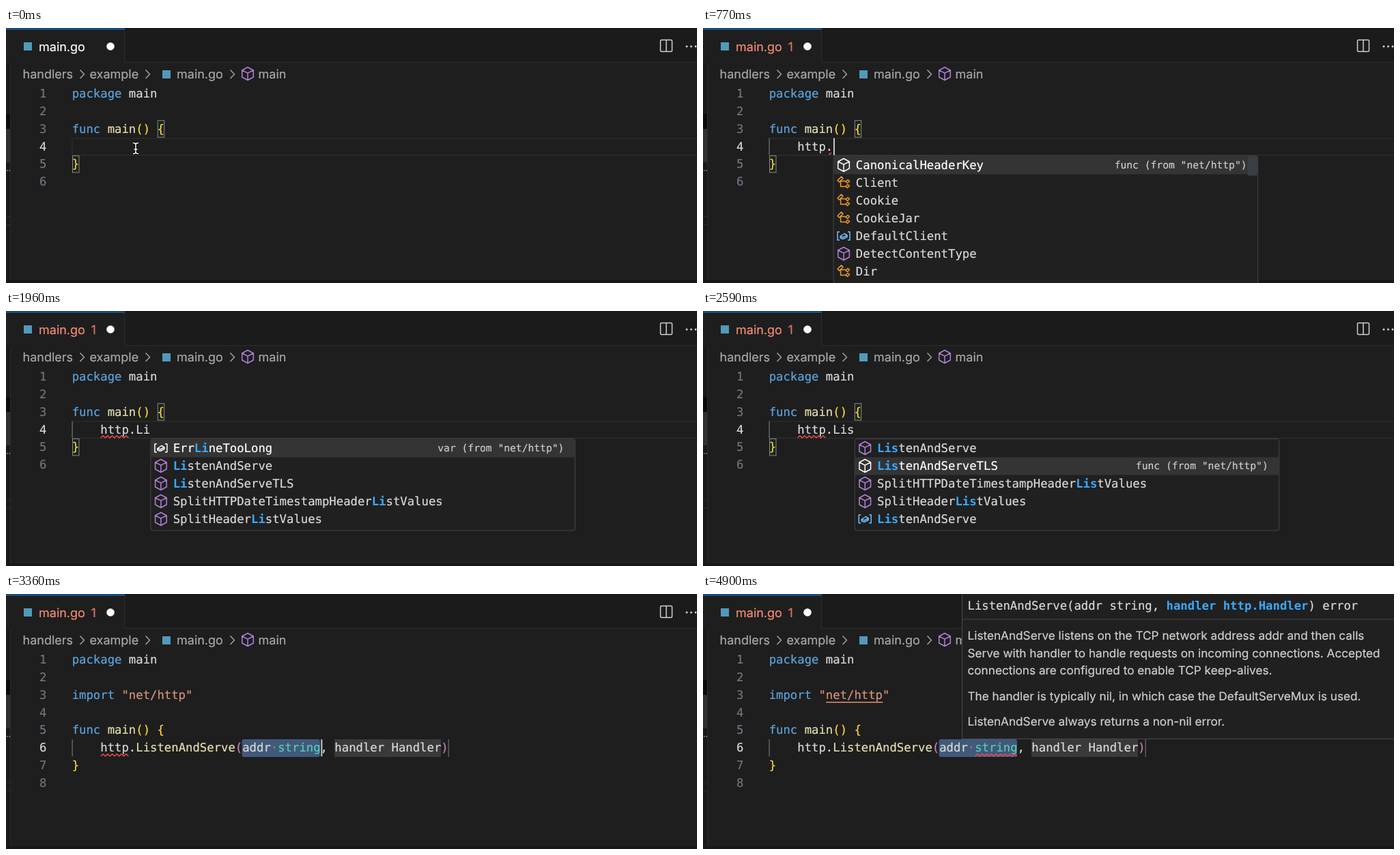
Recreate the animation shown at these times as an HTML page. Size 1012 by 374 pixels, loop 5390 ms.

```html
<!DOCTYPE html>
<html lang="en">
<head>
<meta charset="utf-8">
<title>Editor completion</title>
<style>
  html, body { margin: 0; height: 100%; overflow: hidden; background: #1e1e1e; }
  svg { display: block; width: 1012px; height: 374px; }
  /* a hairline stroke gives the text its slightly heavy smoothing */
  text { white-space: pre; text-rendering: geometricPrecision; font: 18px Inter, sans-serif;
    fill: currentColor; stroke: currentColor; stroke-width: .2px; }
  tspan { fill: currentColor; stroke: currentColor; }
  .mono { font: 17.27px "DejaVu Sans Mono", monospace; }
  .doc { font-size: 17.2px; }
  .detail { font: 14.65px "DejaVu Sans Mono", monospace; text-anchor: end; }
  .num { text-anchor: end; }
  .hit { font-weight: bold; color: #3aa9ff; stroke: none; }
  .icon { fill: none; stroke-width: 1.5; stroke-linejoin: round; }
</style>
</head>
<body>
<svg viewBox="0 0 1012 374">
  <rect width="1012" height="374" fill="#1e1e1e"/>
  <rect x="174" width="838" height="51" fill="#1b1b1b"/>
  <path d="M173.5 2V50.5H1012" fill="none" stroke="#2d2d2d"/>
  <rect width="1012" height="1" fill="#151515"/>
  <rect y=".6" width="174" height="1.8" fill="#1468b4"/>
  <!-- sidebar sliver and lower edge -->
  <rect y="52" width="6" height="322" fill="#191919"/>
  <rect y="126" width="6" height="22" fill="#0b0b0b"/>
  <rect y="148" width="6" height="49" fill="#303030"/>
  <path d="M6.5 52V374M0 276.5H6M0 288.5H6" stroke="#2b2b2b"/>
  <path d="M1 209h1.6M4.5 209h1.6" stroke="#999" stroke-width="1.6"/>
  <rect y="370" width="1012" height="4" fill="#171717"/>
  <!-- tab and toolbar -->
  <rect x="26" y="21" width="12" height="12" fill="#519aba"/>
  <circle cx="153" cy="27" r="5.8" fill="#fff"/>
  <g class="icon" stroke="#d0d0d0"><rect x="958.5" y="17.5" width="17" height="17" rx="1.5"/><path d="M967 18V34"/></g>
  <g fill="#d0d0d0"><circle cx="997" cy="27" r="1.5"/><circle cx="1003.5" cy="27" r="1.5"/><circle cx="1010" cy="27" r="1.5"/></g>
  <!-- breadcrumbs -->
  <g color="#a9a9a9">
    <text x="24.5" y="74">handlers</text><text x="122.5" y="74">example</text>
    <text x="250" y="74">main.go</text><text x="369.5" y="74">main</text>
  </g>
  <path class="icon" stroke="#a0a0a0" d="M108.5 61.5l6 6.3-6 6.3M204.5 61.5l6 6.3-6 6.3M328.5 61.5l6 6.3-6 6.3"/>
  <rect x="229" y="62" width="12" height="12" fill="#519aba"/>
  <g id="view"></g>
</svg>
<script>
const LOOP = 5390, CH = 10.397, ROW = 25.85;
const KEY = '#5ba6e2', FN = '#e4e2b0', GOLD = '#ffd83c', TXT = '#dadada',
      STR = '#d99479', PINK = '#c586c0', TYPE = '#55d0b8';
const ICONS = {
  func: ['#b180d7', 'M0-9.5L8.3-5V5L0 9.5L-8.3 5V-5ZM-8.3-5L0-.8L8.3-5M0-.8V9.5'],
  type: ['#ee9d28', 'M-9-3.5L-3.5-9L-1-6.5L-6.5-1ZM3-2.5H-4.5V5.5H3M3-1.5L6-4.5L8.5-2.5L5.5.5ZM3 5.5L6 2.5L8.5 4.5L5.5 7.5Z'],
  var: ['#75beff', 'M-6-6H-9V6H-6M6-6H9V6H6M-5 .5L1-3.5L5-1V1.5L-1 4.5L-5 3ZM-5 .5L-1 2L5-1']
};

const packages = [['pkg', 'http'], ['pkg', 'httptest'], ['pkg', 'httptrace'], ['pkg', 'httputil'], ['pkg', 'http']];
const members = [['func', 'CanonicalHeaderKey'], ['type', 'Client'], ['type', 'Cookie'], ['type', 'CookieJar'],
  ['var', 'DefaultClient'], ['func', 'DetectContentType'], ['type', 'Dir']];
const listen = [['func', 'ListenAndServe'], ['func', 'ListenAndServeTLS'],
  ['func', 'SplitHTTPDateTimestampHeaderListValues'], ['func', 'SplitHeaderListValues']];
const withLi = [['var', 'ErrLineTooLong'], ...listen];
const withLis = [...listen, ['var', 'ListenAndServe']];

// Timelines: [start, value...]
const typed = [[0, ''], [70, 'h'], [140, 'ht'], [210, 'htt'], [490, 'http'], [630, 'http.'],
  [1260, 'http.L'], [1400, 'http.Li'], [2030, 'http.Lis']];
const caret = [[0, 0], [70, 1], [1120, 0], [1260, 1], [1960, 0], [2030, 1], [2590, 0],
  [3080, 1], [3850, 0], [4410, 1], [4900, 0]];
const popups = [[0], [280, packages, 'htt', 7], [560, packages, 'http', 8], [630], [700, members, '', 9],
  [1330, withLi, 'L', 10], [1470, withLi, 'Li', 11], [2100, withLis, 'Lis', 12],
  [2450, withLis, 'Lis', 12, 1], [2870, withLis, 'Lis', 12], [3360]];
const errors = [[0], [350, 4, 7], [490, 4, 8], [630], [770, 8.4, 9], [1540, 4, 8], [3640, 29, 35]];

const at = (list, t) => list.findLast(step => step[0] <= t);
const colX = col => 97 + col * CH;
const lineY = n => 96 + (n - 1) * ROW;
const rect = (x, y, w, h, fill, extra = '') => `<rect x="${x}" y="${y}" width="${w}" height="${h}" fill="${fill}" ${extra}/>`;
const text = (x, y, color, s, cls = '') => `<text x="${x}" y="${y}" color="${color}" class="${cls}">${s}</text>`;
const span = (s, color) => `<tspan color="${color}">${s}</tspan>`;

function code(n, col, ...parts) {
  let s = '';
  for (let i = 0; i < parts.length; i += 2) s += span(parts[i], parts[i + 1]);
  return text(colX(col) - .3, lineY(n) + 6, TXT, s, 'mono');
}

function numbers(count, active) {
  let s = '';
  for (let n = 1; n <= count; n++) s += text(59.5, lineY(n) + 6, n === active ? '#d8d8d8' : '#6e7681', n, 'mono num');
  return s;
}

function icon(kind, x, y, stroke) {
  if (kind === 'pkg') return text(x - 10.4, y + 6, '#d0d0d0', '{}', 'mono');
  const [color, d] = ICONS[kind];
  return `<path class="icon" transform="translate(${x} ${y})" stroke="${stroke || color}" d="${d}"/>`;
}

function squiggle(n, from, to) {
  const y = lineY(n) + 12.5;
  let d = '';
  for (let x = colX(from), up = 0; x <= colX(to); x += 3.4, up = !up) d += `${d ? 'L' : 'M'}${x} ${y - (up ? 3 : 0)}`;
  return `<path d="${d}" fill="none" stroke="#f14c4c" stroke-width="1.4"/>`;
}

const guide = n => rect(96.5, lineY(n) - 12, 1.2, 25, '#707070');
const caretAt = (n, col) => rect(colX(col) + .4, lineY(n) - 12, 2, 25, '#c8c8c8');
const bracketBox = (n, col) => rect(colX(col) + .5, lineY(n) - 12, 9.5, 24.5, '#1b251b', 'stroke="#888"');

function popup(items, match, col, sel = 0) {
  const x = colX(col) + .5, all = items === members;
  let s = rect(x, 187.5, 621.5, all ? 200 : 134.5, '#202020', 'stroke="#454545" rx="3"')
    + rect(x + .5, 188.5 + sel * 26, 620.5, 26, '#343435');
  if (all) s += rect(x + 606.5, 188.5, 14, 28, '#3b3e44');
  items.forEach(([kind, name], i) => {
    const y = 201 + i * 26, on = i === sel, k = name.indexOf(match);
    const label = name.slice(0, k) + `<tspan class="hit">${match}</tspan>` + name.slice(k + match.length);
    s += icon(kind, x + 15, y, on && '#fff') + text(x + 32.8, y + 6, on ? '#fff' : TXT, label, 'mono');
    if (on) {
      const word = kind === 'pkg' ? '"net/http"' : `${kind} (from "net/http")`;
      s += text(x + 605.5, y + 5, '#cccccc', word, 'detail');
    }
  });
  return s;
}

function signature() {
  const doc = [[67, 'ListenAndServe listens on the TCP network address addr and then calls'],
    [92.5, 'Serve with handler to handle requests on incoming connections. Accepted'],
    [118, 'connections are configured to enable TCP keep-alives.'],
    [155.5, 'The handler is typically nil, in which case the DefaultServeMux is used.'],
    [193, 'ListenAndServe always returns a non-nil error.']];
  return rect(379.5, -4, 650, 216.5, '#202020', 'stroke="#4a4a4a"') + rect(380, 36.5, 632, 1, '#454545')
    + text(387.5, 22.5, TXT, 'ListenAndServe(addr string, <tspan class="hit">handler http.Handler</tspan>) error', 'mono')
    + doc.map(([y, s]) => text(387.5, y, '#d0d0d0', s, 'doc')).join('');
}

const mouse = (color, width) => `<path d="M186 168.5Q190 168.5 190 171V181.5Q190 184.5 186 184.5M194 168.5Q190 168.5 190 171V181.5Q190 184.5 194 184.5M187.5 178H192.5" fill="none" stroke="${color}" stroke-width="${width}"/>`;
const mainFunc = n => code(n, 0, 'func ', KEY, 'main', FN, '() {', GOLD);

function underline(n, t) {
  const [, from, to] = at(errors, t);
  return from ? squiggle(n, from, to) : '';
}

function typing(t) {
  const word = at(typed, t)[1], [, items, ...rest] = at(popups, t);
  let s = numbers(6, 4)
    + '<path d="M1012 162H97V186.5H1012" fill="none" stroke="#2c2c2c" stroke-width="1.5"/>'
    + bracketBox(3, 12) + bracketBox(5, 0)
    + mainFunc(3) + code(4, 4, word, TXT) + code(5, 0, '}', GOLD)
    + (word ? guide(4) : mouse('#000', 3.5) + mouse('#fff', 1.5))
    + underline(4, t);
  if (at(caret, t)[1]) s += caretAt(4, 4 + word.length);
  return s + (items ? popup(items, ...rest) : '');
}

function inserted(t) {
  const y = lineY(6) - 12.2;
  let s = numbers(8, 6) + guide(6)
    + code(3, 0, 'import ', KEY, '"net/http"', STR) + mainFunc(5)
    + rect(colX(24) - 1, y, 11 * CH, 26, '#41597a', 'rx="3"') + rect(colX(37) - .7, y, 15 * CH, 26, '#3a3a3b')
    + rect(647.5, y, 1.5, 26, '#5c5c5c')
    + code(6, 4, 'http.', TXT, 'ListenAndServe', FN, '(', PINK, 'addr', TXT, '·', '#73879c',
      'string', TYPE, ', handler Handler', TXT, ')', PINK)
    + code(7, 0, '}', GOLD) + underline(6, t);
  if (t >= 4410) s += rect(colX(8), 158, 8 * CH, 1.5, STR);
  if (at(caret, t)[1]) s += caretAt(6, 35);
  return s + (t >= 3500 ? signature() : '');
}

function render(t) {
  const bad = t >= 350;
  return text(48, 33.5, bad ? '#f78b74' : '#fff', 'main.go')
    + (bad ? text(124.5, 33.5, '#dd7563', '1') : '')
    + icon('func', 354, 67)
    + code(1, 0, 'package ', KEY, 'main', TXT)
    + (t < 3360 ? typing(t) : inserted(t));
}

const view = document.getElementById('view');
let shown = '';
function tick() {
  const html = render(performance.now() % LOOP);
  if (html !== shown) view.innerHTML = shown = html;
  requestAnimationFrame(tick);
}
tick();
</script>
</body>
</html>
```
